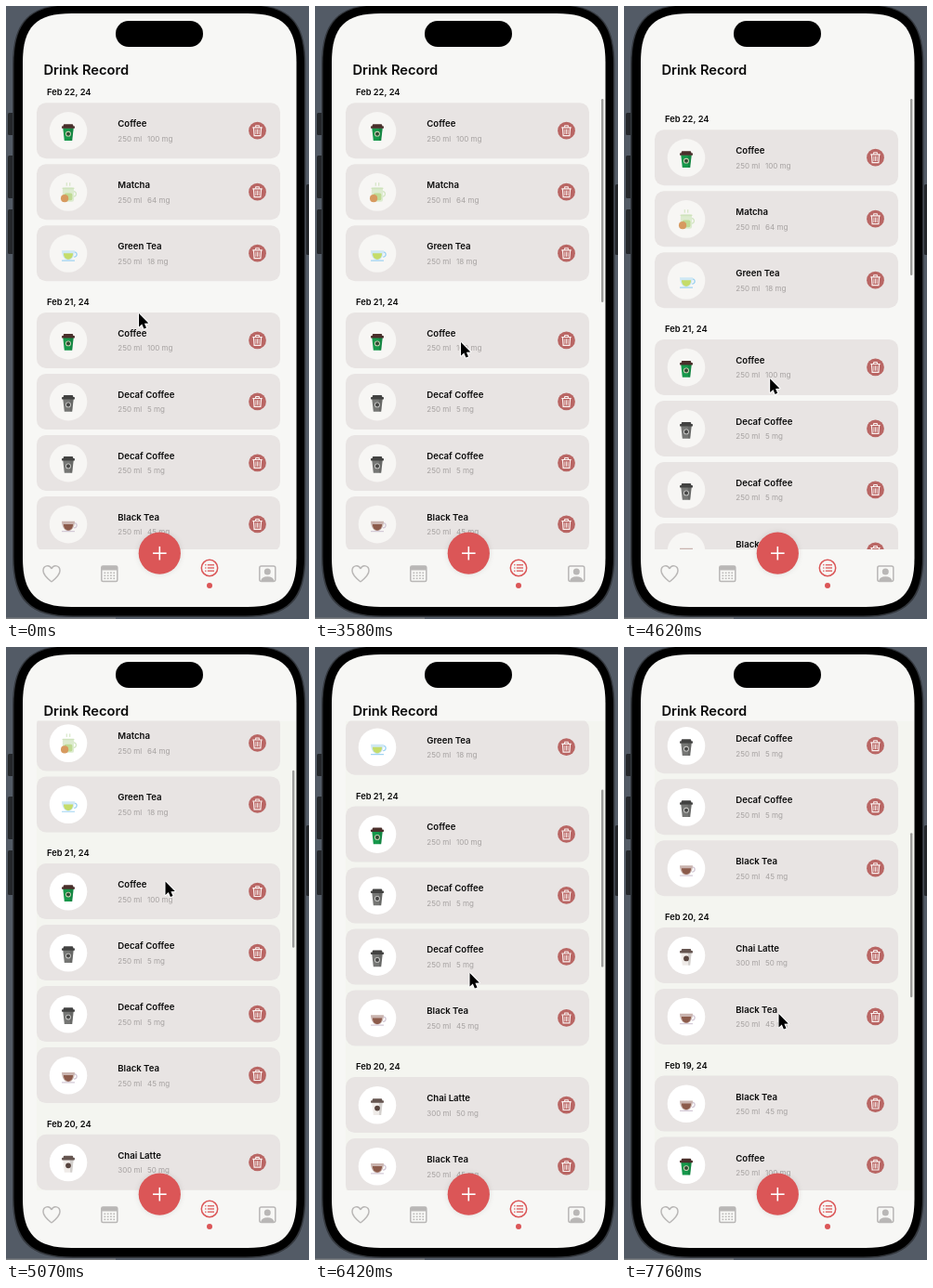
Recreate the animation shown at these times as an HTML page with a canvas. Size 326 by 660 pixels, loop 8 s.

```html
<!DOCTYPE html>
<html lang="en">
<head>
<meta charset="utf-8">
<title>Drink Record</title>
<style>
  html, body { margin: 0; width: 100%; height: 100%; overflow: hidden; background: #535b66; }
  canvas { display: block; width: 326px; height: 660px; }
</style>
</head>
<body>
<canvas id="stage"></canvas>
<script>
const W = 326, H = 660, LOOP = 8000, TICK = 149;
const canvas = document.getElementById('stage');
const dpr = window.devicePixelRatio || 1;
canvas.width = W * dpr;
canvas.height = H * dpr;
const g = canvas.getContext('2d');
const FONT = 'Inter, "Open Sans", sans-serif';
const RED = '#db5657', GREY = '#b9b7b6', INK = '#0b0b0b', SOFT = '#a5a1a0';
const LIST_TOP = 79.5, LIST_END = 585, ROW = 66, BAR_START = 3570;

const groups = [
  ['Feb 22, 24', ['Coffee', 'Matcha', 'Green Tea']],
  ['Feb 21, 24', ['Coffee', 'Decaf Coffee', 'Decaf Coffee', 'Black Tea']],
  ['Feb 20, 24', ['Chai Latte', 'Black Tea']],
  ['Feb 19, 24', ['Black Tea', 'Coffee']]
];
const drinks = {
  'Coffee': ['250 ml', '100 mg', () => cup('#16984b', '#4a2f2b', '#d9d8bd', '#2f4a32')],
  'Decaf Coffee': ['250 ml', '5 mg', () => cup('#757674', '#424241', '#cfcfcd', '#454544')],
  'Chai Latte': ['300 ml', '50 mg', () => cup('#efebe8', '#655550', '#57443e', '#57443e')],
  'Matcha': ['250 ml', '64 mg', matcha],
  'Green Tea': ['250 ml', '18 mg', () => teaCup('#cfe8f4', '#c5dc6a', '#9fd3f2')],
  'Black Tea': ['250 ml', '45 mg', () => teaCup('#c9b3ae', '#8c5b4b', '#d3c9d6')]
};

// Each move: start ms, end ms, then the values reached.
const pointerMoves = [
  [300, 600, 144, 378], [2277, 2840, 152, 285], [3130, 3270, 157, 362],
  [3589, 4330, 154, 434], [4453, 5066, 171.5, 252.5], [5520, 5815, 163, 429],
  [6107, 6707, 170, 273], [6870, 7301, 172, 201], [7460, 7748, 166.5, 395]
];
const scrollMoves = [
  [3823, 4400, 29], [4620, 5120, -101], [6107, 6707, -216], [6870, 7301, -319.7]
];

function ease(u) {
  u = Math.min(1, Math.max(0, u));
  return u * u * (3 - 2 * u);
}
function follow(from, moves, t) {
  return moves.reduce((now, [a, b, ...to]) => {
    const p = ease((t - a) / (b - a));
    return now.map((v, i) => v + (to[i] - v) * p);
  }, from);
}

function box(x, y, w, h, r, fill) {
  g.beginPath();
  g.roundRect(x, y, w, h, r);
  g.fillStyle = fill;
  g.fill();
}
// Rounded box whose corners ease into the straight sides.
function smoothBox(x, y, w, h, r, fill) {
  const e = 1.28 * r, c = 0.354 * r, X = x + w, Y = y + h;
  g.beginPath();
  g.moveTo(x + e, y);
  g.lineTo(X - e, y);
  g.bezierCurveTo(X - c, y, X, y + c, X, y + e);
  g.lineTo(X, Y - e);
  g.bezierCurveTo(X, Y - c, X - c, Y, X - e, Y);
  g.lineTo(x + e, Y);
  g.bezierCurveTo(x + c, Y, x, Y - c, x, Y - e);
  g.lineTo(x, y + e);
  g.bezierCurveTo(x, y + c, x + c, y, x + e, y);
  g.fillStyle = fill;
  g.fill();
}
function disc(x, y, r, fill) {
  g.beginPath();
  g.arc(x, y, r, 0, Math.PI * 2);
  g.fillStyle = fill;
  g.fill();
}
function arc(x, y, r, a, b, color, width) {
  g.beginPath();
  g.arc(x, y, r, a, b);
  g.strokeStyle = color;
  g.lineWidth = width;
  g.stroke();
}
function poly(points, fill) {
  g.beginPath();
  points.forEach(([x, y]) => g.lineTo(x, y));
  g.closePath();
  g.fillStyle = fill;
  g.fill();
}
function line(color, width, ...points) {
  g.beginPath();
  points.forEach(([x, y]) => g.lineTo(x, y));
  g.strokeStyle = color;
  g.lineWidth = width;
  g.stroke();
}
function text(s, x, y, size, weight, color) {
  g.font = `${weight} ${size}px ${FONT}`;
  g.fillStyle = color;
  g.fillText(s, x, y);
}
function at(x, y, draw, scale = 1) {
  g.save();
  g.translate(x, y);
  g.scale(scale, scale);
  draw();
  g.restore();
}

function cup(body, lid, badge, dot) {
  poly([[-6.6, -5], [6.6, -5], [4.8, 11], [-4.8, 11]], body);
  poly([[2, -5], [6.6, -5], [4.8, 11], [2.5, 11]], 'rgba(0,0,0,.12)');
  box(-6, -9.5, 12, 3.5, 1.2, lid);
  box(-8, -7.2, 16, 3, 1, lid);
  disc(0, 2.5, 3.3, badge);
  disc(0, 2.5, 2.3, dot);
}

function matcha() {
  for (const x of [-2, 2]) line('#c9dfb4', 1, [x, -13], [x, -9]);
  arc(6.5, 1, 3.2, -1.5, 1.5, '#d3e5c3', 1.5);
  box(-7, -6.5, 14, 17, 2.5, '#dcebcf');
  box(-5, 0, 10, 9, 2, '#bfdb94');
  box(-7.5, -7, 15, 2, 1, '#cfe3bd');
  disc(-4.5, 6.5, 4.7, '#d79a5f');
}

function bowl(w, top, depth, fill) {
  g.beginPath();
  g.moveTo(-w, top);
  g.bezierCurveTo(-w, top + depth, w, top + depth, w, top);
  g.fillStyle = fill;
  g.fill();
}
function teaCup(glass, tea, rim) {
  arc(7.5, 0, 3, -1.6, 1.7, rim, 1.6);
  bowl(8, -5, 16, glass);
  bowl(5.8, -1.5, 10, tea);
  line(rim, 1.4, [-8, 7.5], [8, 7.5]);
}

function trash() {
  disc(0, 0, 9.4, '#b96664');
  const c = '#faf1f0';
  line(c, 1.2, [-5.2, -3.4], [5.2, -3.4]);
  line(c, 1.1, [-2, -3.6], [-1.7, -5.4], [1.7, -5.4], [2, -3.6]);
  line(c, 1.2, [-4.1, -3.2], [-3.4, 5.4], [3.4, 5.4], [4.1, -3.2]);
  for (const x of [-1.6, 0, 1.6]) line(c, 0.8, [x, -1.6], [x, 3.8]);
}

function card(name, y, plate) {
  if (y > LIST_END || y < 10) return;
  const [volume, dose, icon] = drinks[name];
  box(33, y, 262, 60, 10, '#e8e4e3');
  disc(67, y + 30.2, 20.3, plate);
  at(67, y + 31.3, icon, 0.87);
  text(name, 120.3, y + 26, 9.6, 600, INK);
  text(volume, 120.3, y + 41.5, 8, 400, SOFT);
  text(dose, 152, y + 41.5, 8, 400, SOFT);
  at(270.5, y + 30, trash);
}

function scrollBar(offset) {
  // The thumb shortens as more rows load and when pulled past the top.
  const len = offset > -30 ? 219 : offset > -200 ? 191 : 177;
  const top = 100 - Math.min(0, offset) * len / 565;
  box(308, top, 2.4, len - Math.max(0, offset), 1.2, '#9b9b99');
}

function list(offset, bar) {
  const moved = offset < 0;
  g.save();
  g.beginPath();
  g.rect(18, LIST_TOP, 294, LIST_END - LIST_TOP);
  g.clip();
  if (moved) box(33, LIST_TOP, 279, LIST_END - LIST_TOP, 0, '#f4f5f0');
  let y = 93 + offset;
  for (const [date, names] of groups) {
    text(date, 44, y + 3.3, 9.3, 600, INK);
    names.forEach((n, i) => card(n, y + 11.2 + i * ROW, moved ? '#fff' : '#f7f6f4'));
    y += 27.7 + names.length * ROW;
  }
  if (bar) scrollBar(offset);
  g.restore();
}

function heart() {
  g.beginPath();
  g.moveTo(0, 9);
  for (const s of [-1, 1]) {
    g.moveTo(0, 9);
    g.bezierCurveTo(5 * s, 5, 9 * s, 1.5, 9 * s, -3);
    g.bezierCurveTo(9 * s, -9, 2 * s, -10, 0, -5);
  }
  g.strokeStyle = GREY;
  g.lineWidth = 1.5;
  g.stroke();
}

function tile(r) {
  g.beginPath();
  g.roundRect(-8.5, -8, 17, 16.5, r);
  g.strokeStyle = GREY;
  g.lineWidth = 1.5;
  g.stroke();
}

function calendar() {
  tile(1.5);
  box(-8.5, -8, 17, 4.5, 1, GREY);
  for (let i = 0; i < 12; i++)
    box(-5.8 + (i % 4) * 3.3, -1.4 + Math.floor(i / 4) * 3, 1.7, 1.5, 0, GREY);
}

function profile() {
  tile(2);
  disc(0, -2, 3.5, GREY);
  g.beginPath();
  g.ellipse(0, 8, 7, 4.8, 0, Math.PI, 0);
  g.fill();
}

function listIcon() {
  arc(0, 0, 8.7, 0, Math.PI * 2, RED, 1.5);
  for (const y of [-3.2, 0, 3.2]) {
    disc(-4.2, y, 0.8, RED);
    line(RED, 1.3, [-2.2, y], [5, y]);
  }
}

function addButton() {
  g.save();
  g.shadowColor = 'rgba(0,0,0,.1)';
  g.shadowBlur = 6 * dpr;
  disc(0, 0, 22.6, RED);
  g.restore();
  line('#fff', 1.6, [-7.3, 0], [7.3, 0]);
  line('#fff', 1.6, [0, -7.3], [0, 7.3]);
}

function tabs() {
  at(49, 611, heart);
  at(111.3, 611, calendar);
  at(219, 605, listIcon);
  disc(219, 624, 3, RED);
  at(281.3, 611, profile);
  at(165.3, 589.2, addButton);
}

function phone() {
  g.fillStyle = '#535b66';
  g.fillRect(0, 0, W, H);
  for (const [y, h] of [[115, 24], [161, 46], [219, 48]]) box(2, y, 8, h, 1.5, '#24272b');
  box(323, 192, 6, 76, 1.5, '#24272b');
  smoothBox(7, -2, 315.5, 660, 51, '#34383e');
  smoothBox(8.5, -1, 312.5, 657.5, 50, '#000');
  box(0, 658.5, 118, 2, 0, '#7b7d80');
  smoothBox(18, 8, 294.5, 639, 41, '#f7f7f5');
  box(118, 16, 94, 28, 14, '#000');
}

function pointer() {
  const shape = [[0, 0], [0, 14.6], [3.3, 11.6], [5.4, 16.6], [8, 15.5], [5.9, 10.7], [10.3, 10.5]];
  g.lineJoin = 'round';
  line('#fff', 2, ...shape, shape[0]);
  poly(shape, '#000');
}

function draw(now) {
  const t = Math.floor(now % LOOP / TICK) * TICK;
  const [x, y] = follow([143, 331], pointerMoves, t);
  const [offset] = follow([0], scrollMoves, t);
  g.setTransform(dpr, 0, 0, dpr, 0, 0);
  phone();
  list(offset, t >= BAR_START);
  text('Drink Record', 40.5, 74.3, 14.7, 600, INK);
  tabs();
  at(x, y, pointer);
}

const start = performance.now();
function loop() {
  draw(performance.now() - start);
  requestAnimationFrame(loop);
}
loop();
</script>
</body>
</html>
```
